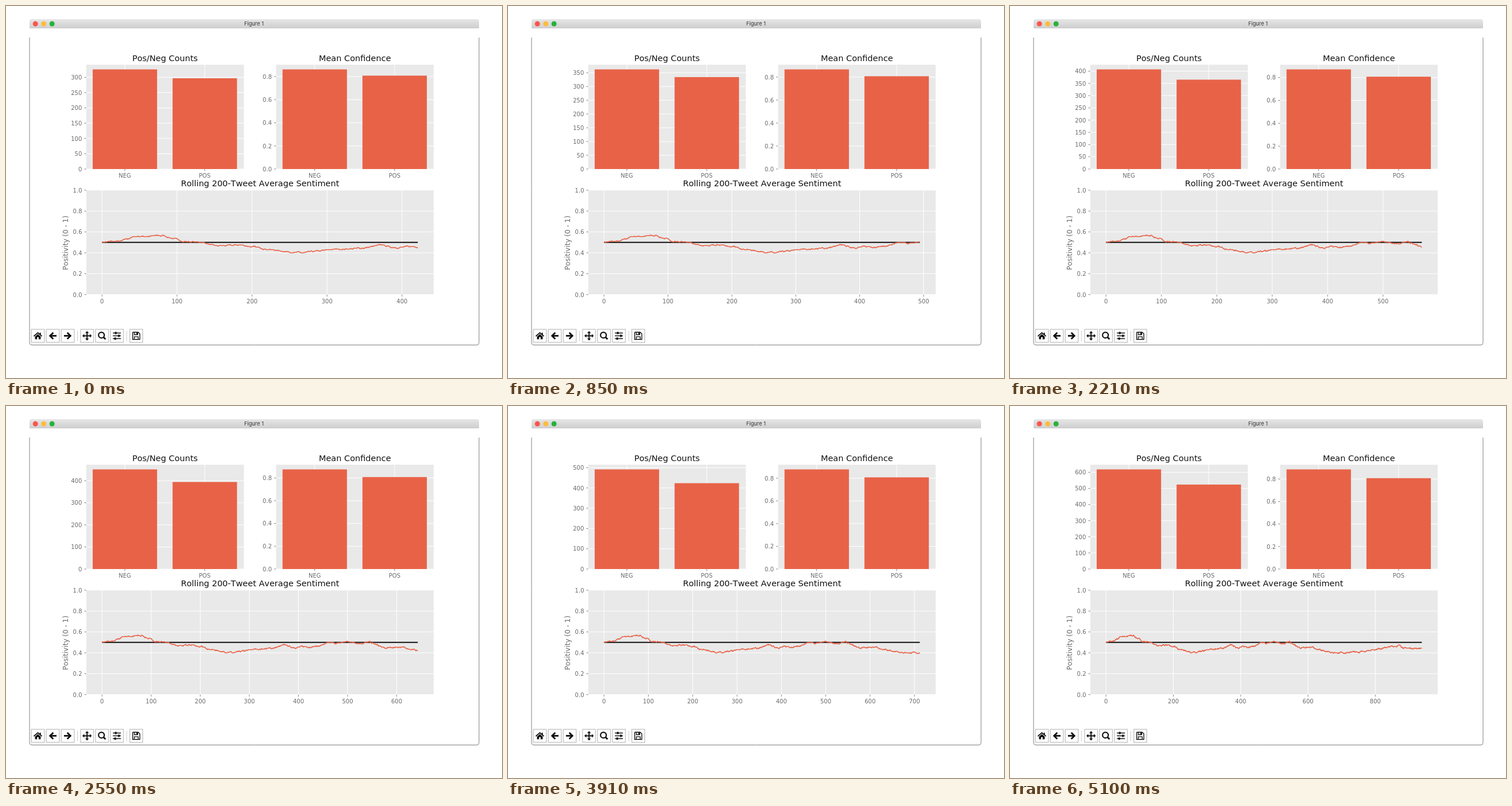
Recreate the animation shown at these times as an HTML page with a canvas. Size 864 by 648 pixels, loop 5950 ms.

```html
<!DOCTYPE html>
<html lang="en">
<head>
<meta charset="utf-8">
<title>Figure 1</title>
<style>
  html, body { margin: 0; width: 100%; height: 100%; overflow: hidden; background: #fff; }
  canvas { display: block; }
</style>
</head>
<body>
<canvas id="stage" width="864" height="648"></canvas>
<script>
const ctx = document.getElementById('stage').getContext('2d');
const STEP_MS = 850;
const CORAL = '#e86247', PANEL = '#e9e9e9', GRAY = '#6a6a6a', INK = '#111';

// Negative and positive totals at each update
const counts = [[325, 296], [361, 333], [406, 364], [450, 393], [490, 422], [591, 506], [616, 522]];

// Turning points of the rolling positivity: sample, thousandths
const turns = [
  [0, 503], [26, 512], [44, 557], [82, 564], [108, 510], [135, 500], [150, 464], [185, 474],
  [236, 420], [268, 398], [310, 433], [345, 443], [374, 474], [386, 452], [440, 463],
  [463, 496], [480, 489], [497, 508], [526, 492], [545, 502], [576, 443], [604, 458],
  [638, 427], [667, 402], [752, 404], [780, 425], [835, 453], [872, 470], [888, 444], [944, 444]
];

let seed = 7, drift = 0;
const random = () => (seed = seed * 16807 % 2147483647) / 2147483647;

// Line through the turns plus a small random drift; a 200-sample mean moves in steps of 1/200
const series = [];
for (let k = 1; k < turns.length; k++) {
  const [i0, v0] = turns[k - 1], [i1, v1] = turns[k];
  for (let i = i0; i < i1; i++) {
    drift = drift * .8 + (random() - .5) * .008;
    const mean = (v0 + (v1 - v0) * (i - i0) / (i1 - i0)) / 1000;
    series.push(Math.round((mean + drift) * 200) / 200);
  }
}

function rect(x, y, w, h, color) {
  ctx.fillStyle = color;
  ctx.fillRect(x, y, w, h);
}

function trace(points) {
  ctx.beginPath();
  points.forEach(([x, y]) => ctx.lineTo(x, y));
}

function stroke(points, color, width) {
  trace(points);
  ctx.strokeStyle = color;
  ctx.lineWidth = width;
  ctx.stroke();
}

function fill(points) {
  trace(points);
  ctx.fillStyle = INK;
  ctx.fill();
}

function text(str, x, y, size, color, align = 'center', family = '"DejaVu Sans", sans-serif') {
  ctx.font = `${size}px ${family}`;
  ctx.textAlign = align;
  ctx.fillStyle = color;
  ctx.fillText(str, x, y);
}

function circle(x, y, r) {
  ctx.beginPath();
  ctx.arc(x, y, r, 0, Math.PI * 2);
}

function panel(x, y, w, h, title) {
  rect(x, y, w, h, PANEL);
  text(title, x + w / 2, y - 6.8, 14.5, INK);
}

function tickY(x, y, w, label) {
  stroke([[x, y], [x + w, y]], '#fff', 1);
  stroke([[x - 3.5, y], [x, y]], GRAY, .8);
  text(label, x - 7.5, y + 3.8, 10, GRAY, 'right');
}

function tickX(x, y, h, label) {
  stroke([[x, y - h], [x, y]], '#fff', 1);
  stroke([[x, y], [x, y + 3.5]], GRAY, .8);
  text(label, x, y + 15, 10, GRAY);
}

function barChart(x, title, values, step, digits) {
  const y = 102.3, w = 274.5, h = 181.7, bottom = y + h, pitch = 139.2;
  const top = Math.max(...values) * 1.05;
  panel(x, y, w, h, title);
  for (let i = 0; i * step <= top; i++) {
    tickY(x, bottom - i * step / top * h, w, (i * step).toFixed(digits));
  }
  ['NEG', 'POS'].forEach((label, i) => tickX(x + 67.2 + i * pitch, bottom, h, label));
  values.forEach((v, i) => {
    const bar = v / top * h + .5;
    rect(x + 11.2 + i * pitch, bottom - bar, 112.2, bar, CORAL);
  });
}

function lineChart(count) {
  const x = 140, y = 320.8, w = 605, h = 181.9, bottom = y + h;
  const px = i => x + 27.3 + i / count * 550;
  const py = v => bottom - v * h;
  panel(x, y, w, h, 'Rolling 200-Tweet Average Sentiment');
  for (let i = 0; i <= 5; i++) tickY(x, py(i / 5), w, (i / 5).toFixed(1));
  const step = count < 800 ? 100 : 200;
  for (let i = 0; i <= count * 1.05; i += step) tickX(px(i), bottom, h, i);
  stroke([[px(0), py(.5)], [px(count), py(.5)]], INK, 1.9);
  stroke(series.slice(0, count + 1).map((v, i) => [px(i), py(v)]), CORAL, 1.6);

  ctx.save();
  ctx.translate(108, 412.5);
  ctx.rotate(-Math.PI / 2);
  text('Positivity (0 - 1)', 0, 0, 12, GRAY);
  ctx.restore();
}

function home() {
  stroke([[-7, .7], [0, -5.4], [7, .7]], INK, 1.8);
  fill([[-5, 1.4], [0, -2.9], [5, 1.4], [5, 6], [-5, 6]]);
  rect(-1.4, 2.4, 2.8, 3.7, '#fff');
  rect(3.2, -5.4, 2, 3.4, INK);
}

function back() {
  stroke([[-5, 0], [6.5, 0]], INK, 2.8);
  stroke([[.8, -5.6], [-4.8, 0], [.8, 5.6]], INK, 2.8);
}

function forward() {
  ctx.scale(-1, 1);
  back();
}

function pan() {
  for (let i = 0; i < 4; i++) {
    stroke([[0, 0], [0, -6]], INK, 2);
    fill([[0, -8.2], [3.2, -4.8], [-3.2, -4.8]]);
    ctx.rotate(Math.PI / 2);
  }
}

function zoom() {
  stroke([[2.8, 2.6], [6.2, 6]], INK, 2.8);
  circle(-1, -1.2, 5);
  ctx.lineWidth = 2.2;
  ctx.stroke();
}

function sliders() {
  [-2, 3.5, -3].forEach((x, i) => {
    const y = (i - 1) * 4.9;
    stroke([[-7, y], [7, y]], INK, 1.5);
    rect(x - 1.5, y - 2, 3, 4, INK);
  });
}

function save() {
  stroke([[-6.2, -6.2], [3.4, -6.2], [6.2, -3.4], [6.2, 6.2], [-6.2, 6.2], [-6.2, -6.2]], INK, 1.4);
  stroke([[-3.4, 6], [-3.4, 1.6], [3.4, 1.6], [3.4, 6]], INK, 1.3);
  stroke([[-3.4, -6], [-3.4, -2], [2.6, -2], [2.6, -6]], INK, 1.3);
  rect(.2, -5.6, 1.8, 3, INK);
}

function toolbar() {
  let x = 55.5;
  for (const group of [[home, back, forward], [pan, zoom, sliders], [save]]) {
    for (const icon of group) {
      ctx.save();
      ctx.translate(x, 574.5);
      ctx.strokeStyle = '#c6c6c6';
      ctx.lineWidth = 1.4;
      ctx.strokeRect(-11.3, -11.3, 22.6, 22.6);
      icon();
      ctx.restore();
      x += 26;
    }
    if (group.length > 1) stroke([[x - 9, 566], [x - 9, 584]], '#ccc', 1);
    x += 7.7;
  }
}

function windowFrame() {
  const shade = ctx.createLinearGradient(0, 23, 0, 39);
  shade.addColorStop(0, '#e6e6e6');
  shade.addColorStop(1, '#cecece');
  ctx.beginPath();
  ctx.roundRect(41, 23, 783, 16, [4, 4, 0, 0]);
  ctx.fillStyle = shade;
  ctx.fill();
  ['#fa564f', '#fdbc40', '#27b33a'].forEach((color, i) => {
    circle(51.2 + i * 14.5, 31, 4.5);
    ctx.fillStyle = color;
    ctx.fill();
  });
  text('Figure 1', 432, 34.3, 9.2, '#333', 'center', 'Inter, sans-serif');

  ctx.beginPath();
  ctx.moveTo(41, 55);
  ctx.arcTo(41, 590.5, 432, 590.5, 4);
  ctx.arcTo(824, 590.5, 824, 55, 4);
  ctx.lineTo(824, 55);
  ctx.strokeStyle = '#808080';
  ctx.lineWidth = 1;
  ctx.stroke();
}

function draw() {
  const [neg, pos] = counts[Math.floor(performance.now() / STEP_MS) % counts.length];
  const progress = (neg - counts[0][0]) / (counts.at(-1)[0] - counts[0][0]);
  const negMean = .859 + .024 * progress ** .7;
  rect(0, 0, 864, 648, '#fff');
  ctx.fontKerning = 'none';
  ctx.lineJoin = 'miter';
  windowFrame();
  toolbar();
  ctx.lineJoin = 'round';
  barChart(139.8, 'Pos/Neg Counts', [neg, pos], neg < 430 ? 50 : 100, 0);
  barChart(470.5, 'Mean Confidence', [negMean, .805], .2, 1);
  lineChart(neg + pos - 200);
  requestAnimationFrame(draw);
}
draw();
</script>
</body>
</html>
```
